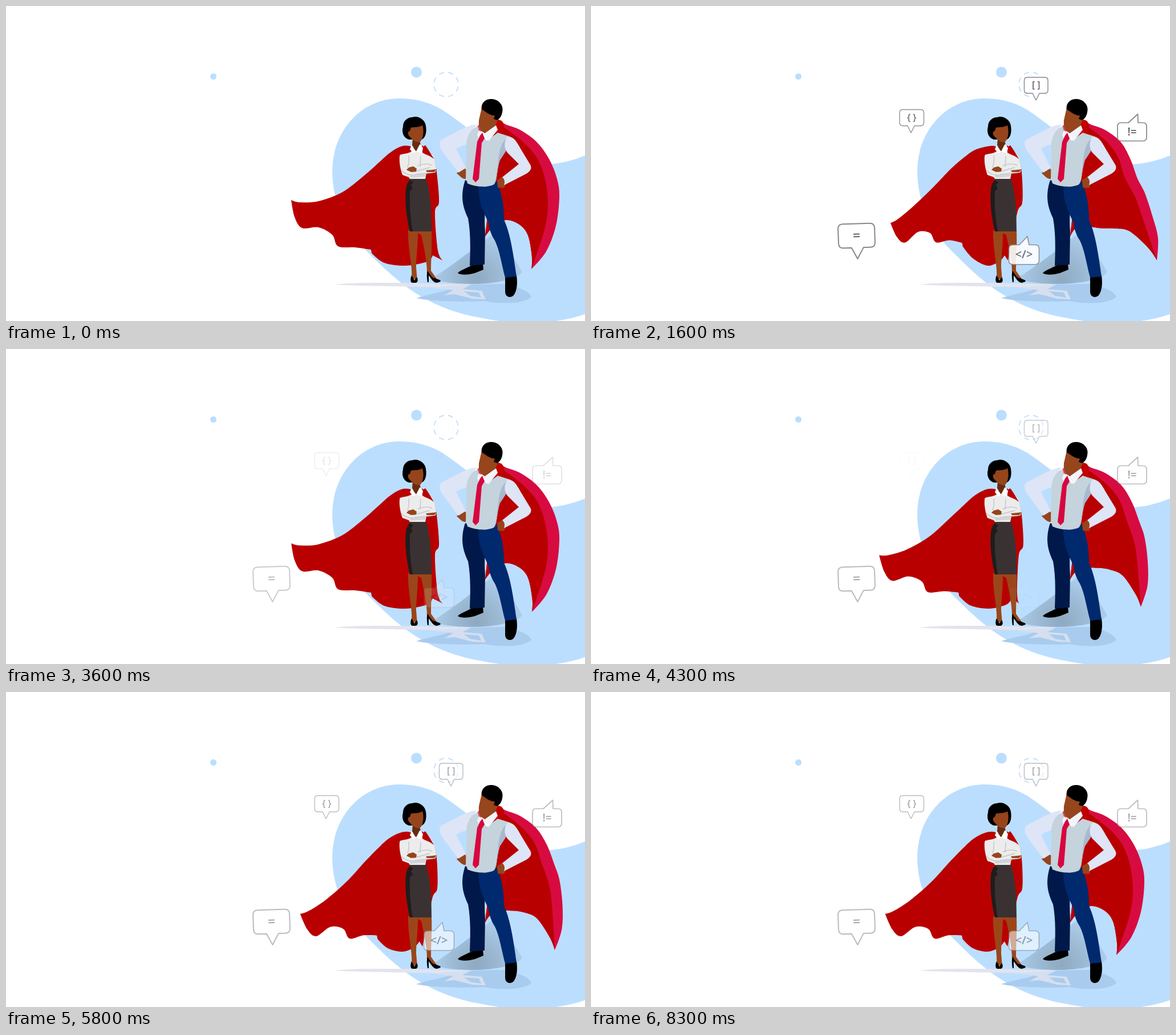
Animation, 1015 px wide and 552 px high, one loop 9100 ms. Source, as an HTML page:

```html
<!DOCTYPE html>
<html lang="en">
<head>
<meta charset="utf-8">
<title>Caped colleagues</title>
<style>
  html, body { margin: 0; width: 100%; height: 100%; overflow: hidden; background: #fff; }
  svg { display: block; width: 100vw; height: 100vh; }
  .bubble path { fill: #fff; stroke: #83858c; stroke-linejoin: round; }
  .bubble text { fill: #606065; font-family: "Open Sans", "Noto Sans", sans-serif; font-weight: 600; text-anchor: middle; }
</style>
</head>
<body>
<svg viewBox="0 0 1015 552" preserveAspectRatio="none">
  <defs>
    <radialGradient id="shade" gradientUnits="userSpaceOnUse" cx="825" cy="478" r="95">
      <stop offset="0" stop-color="#8ea9c1"/>
      <stop offset=".5" stop-color="#9fbdd8"/>
      <stop offset="1" stop-color="#b4d5f3"/>
    </radialGradient>
  </defs>

  <g fill="#bbdeff">
    <path d="M1015 262C985 274 955 281 925 275C860 262 815 215 765 182C740 167 715 162 690 162C622 162 572 220 572 290C572 345 598 394 630 427C680 477 730 528 830 546C890 559 960 559 1015 540Z"/>
    <circle cx="363.5" cy="123.5" r="5.5"/>
    <circle cx="719.5" cy="116" r="9.5"/>
    <circle cx="771.5" cy="137.5" r="21.5" fill="none" stroke="#bbdeff" stroke-width="1.7" pathLength="144" stroke-dasharray="10 8" stroke-dashoffset="-4"/>
  </g>

  <g id="ground">
    <path fill="url(#shade)" d="M852 400C870 405 890 440 905 466C898 480 850 488 812 487C785 487 760 483 745 478C772 462 805 437 852 400Z"/>
    <path fill="#e3e3ee" d="M574 488C620 484 680 485 735 486L815 488L790 494C730 491 640 492 574 488Z"/>
    <path fill="#a9cbee" d="M719 512C740 505 760 503 775 497L815 488L875 487C905 494 919 502 921 510C908 522 870 523 838 517C800 519 750 518 719 512Z"/>
    <path fill="#d5dfef" d="M746 493L816 488L800 496L834 499L841 514L818 513L786 505L768 507L784 498Z"/>
    <path fill="#a9cbee" d="M803 500L829 502L833 511L814 508Z"/>
  </g>

  <path id="band" fill="#d70b40"/>
  <path id="lining" fill="#b90000"/>
  <path id="cape" fill="#b90000"/>

  <g id="woman">
    <path fill="#9b461a" d="M705 393H746C747 422 745 443 745 464L757 481H750L738 468C738 446 732 420 728 401L722 398C722 422 719 440 719 458L721 481L711 477C713 455 704 425 705 393Z"/>
    <path d="M711 472C708 479 709 485 713 485H719C723 483 722 478 720 475L716 481Z"/>
    <path d="M739 464C737 470 738 477 739 484H741V472C746 478 748 484 755 485C761 484 764 482 760 480L752 477C748 478 743 470 739 464Z"/>
    <path fill="#3a3232" d="M709 303L736 302C743 322 746 350 746 395H708C702 370 699 340 701 322C702 312 705 308 709 303Z"/>
    <path fill="#201c1c" d="M708 305L714 309L710 314L713 320L708 324C707 350 709 372 713 395H708C702 370 699 340 701 322C702 313 704 309 708 305Z"/>
    <path d="M712 195C722 191 735 199 736 210C738 222 735 231 729 234H706C697 231 693 222 696 211C696 202 703 195 712 195Z"/>
    <path fill="#652c10" d="M713 231L712 244L719 255L727 243L725 236Z"/>
    <path fill="#96441b" d="M710 213C716 212 724 213 730 209C733 218 732 232 726 238C720 240 713 236 709 230C704 227 703 219 708 219Z"/>
    <path fill="#ececec" d="M711 246L708 255L691 259C688 269 691 285 695 296L706 300L708 303H735L737 293L752 292C757 287 752 275 749 264C747 259 740 257 734 256L730 246L725 243L719 255Z"/>
    <path fill="#b90000" d="M690 247L711 246L712 254C706 259 700 258 690 261ZM729 244C738 250 745 258 750 268C742 261 736 261 730 257Z"/>
    <path fill="#fff" d="M711 244L708 251L714 258L719 255ZM726 242L731 249L729 258L719 255Z"/>
    <path fill="none" stroke="#c3c5ca" stroke-width="1.4" d="M706 262C707 270 706 277 704 283M727 263L726 281M693 288C700 295 708 297 717 296M714 291L743 283M722 280C732 276 740 276 747 279M717 295L748 292"/>
    <path fill="#d3d4d7" d="M709 297L736 293L735 299L708 301Z"/>
    <path fill="#96441b" d="M702 287L706 283L714 281L720 285L719 290L710 291ZM736 288L747 287L755 286L751 291L738 291Z"/>
  </g>

  <g id="man">
    <path d="M818 453C810 459 795 463 792 468C797 472 812 471 822 468L837 462L836 452Z"/>
    <path d="M875 475L895 472C897 486 896 500 889 508C883 512 875 510 875 500Z"/>
    <path fill="#00194a" d="M805 305L830 315L845 318C840 350 838 370 840 395L839 453L813 455C814 430 815 400 810 372C802 355 795 335 805 305Z"/>
    <path fill="#00296e" d="M828 316C840 318 850 316 860 307C870 330 873 350 873 375C885 400 890 440 895 474L875 476C868 450 866 430 857 411C850 400 847 390 846 380C838 362 828 346 828 316Z"/>
    <path fill="#c00000" d="M857 203C864 195 874 202 873 212C872 221 866 226 859 228L860 214Z"/>
    <path fill="#d74763" d="M826 211L831 206L834 219L828 222Z"/>
    <path fill="#96441b" d="M793 290L801 282L807 287L806 303C800 304 795 297 790 293ZM861 305L871 299L877 310L873 319L862 318Z"/>
    <path fill="#dee5f6" d="M825 208C812 207 795 218 765 233C757 237 760 248 766 256L793 292L806 284L789 250C798 245 803 243 807 243L815 222Z"/>
    <path fill="#c5d3dc" d="M827 211C815 214 807 230 807 245C809 270 803 295 809 311C825 318 845 318 855 313C862 305 859 287 866 268C874 255 882 240 884 229L862 222L843 236L830 223Z"/>
    <path fill="#a8b9d0" d="M884 229C873 232 868 243 865 256C860 277 864 296 855 313C862 307 860 288 866 270L876 255Z"/>
    <path fill="#dee5f6" d="M878 230C889 226 896 239 902 250L919 278C923 285 918 290 912 294L873 314C875 308 874 303 870 300L899 277L879 257C873 250 873 239 878 230Z"/>
    <path fill="#7b3513" d="M833 216L858 206L860 217L844 229Z"/>
    <path fill="#96451c" d="M834 178L829 200C828 212 831 219 838 222C848 222 855 215 859 207L864 196L858 180Z"/>
    <path d="M834 181C832 171 840 162 852 163C864 164 873 174 870 186C869 193 865 198 861 200L855 198L857 192C848 192 842 186 834 181Z"/>
    <path fill="#f2f4fc" d="M829 218L837 223L831 238L826 226ZM838 224L859 209L862 217L846 237Z"/>
    <path fill="#d8063f" d="M831 227L835 222L839 232L834 240L829 303L823 309L818 303L826 238Z"/>
  </g>
  <g id="bubbles"></g>
</svg>
<script>
const LOOP = 9100, LAST = 8300, STEP = 100, SWING = 3500;
const { PI, sin, cos, min, max, exp } = Math;
const $ = id => document.getElementById(id);
const clamp = (v, lo, hi) => max(lo, min(hi, v));
const points = s => s.split(/\s+/).map(p => p.split(",").map(Number));

// Capes at rest; everything else follows from the wind rules below
const herCape = points(`735,244 722,250 705,245 690,247 672,258 655,273 628,297 590,326 548,342 515,344
  500,340 506,370 519,389 548,388 572,401 582,421 612,423 640,427 641,433 663,450 700,455 738,448
  748,437 766,446 757,428 752,362 759,344 756,300 752,275 743,256`);
const hisEdge = points("862,198 875,207 901,217 930,238 952,268 966,303 970,335 964,385 947,430");
const hisHem = points("921,461 922,440 915,402 900,383 877,375");
const hisBack = points("855,386 840,404 845,360 850,215");
const hisSeam = points("872,212 905,237 930,265 944,300 950,345 944,392");

// 0 at rest, 1 fully blown; skew makes the rise quicker than the return
function sway(t, end, skew) {
  const p = min(t, end) % SWING / SWING;
  return (1 - cos(2 * PI * p + skew * sin(PI * p))) / 2;
}

// The train turns about her shoulder and billows; the right edge is drawn in
function blowHers(s, stretch, lift) {
  const px = 690, py = 250;
  return ([x, y]) => {
    if (x >= px) return [x - 35 * s * (x - px) / 70 * (max(0, y - 260) / 190) ** 3, y];
    const w = min(1, (px - x) / 190), a = 0.23 * s * w, k = 1 + stretch * s * w;
    const dx = (x - px) * k, dy = (y - py) * k;
    return [px + dx * cos(a) + dy * sin(a), py - dx * sin(a) + dy * cos(a) - lift * s * sin(PI * w)];
  };
}

// The lower part flares out and up while the upper edge is drawn in
function blowHis(s) {
  return ([x, y]) => {
    const k = clamp((y - 300) / 160, 0, 1);
    const dx = 72 * k * k - 9 * exp(-(((y - 290) / 40) ** 2));
    const dy = clamp(1.2 * (908 - x), -24, 22) * min(1, 1.4 * k);
    return [x + dx * s, y + dy * s];
  };
}

// box: x, y, width, height; tail: left, tip x, tip y, right; beat: length of one pulse
const bubbles = [
  { text: "{ }", box: [541, 181.5, 42.5, 28.5], tail: [555, 561, 222, 567], size: 16, line: 1.4, beat: 4100 },
  { text: "[ ]", box: [759.5, 125, 41.5, 28], tail: [774, 780, 165, 786], size: 16, line: 1.4, beat: 3500 },
  { text: "!=", box: [923, 204.5, 51, 32], tail: [942, 958.5, 189.5, 959], size: 19, line: 1.7, beat: 3100 },
  { text: "=", box: [433.5, 381.5, 64, 42], tail: [456, 466, 443, 477], size: 23, line: 2, beat: 2950, turn: -2 },
  { text: "</>", box: [732.5, 418.5, 53, 34.5], tail: [751, 765, 403.5, 768], size: 20, line: 1.6, beat: 4100 }
];

function bubblePath([x, y, w, h], [a, tx, ty, b]) {
  const r = h / 5, up = ty < y;
  const top = up ? `H${a}L${tx} ${ty}L${b} ${y}` : "";
  const low = up ? "" : `H${b}L${tx} ${ty}L${a} ${y + h}`;
  return `M${x + r} ${y}${top}H${x + w - r}q${r} 0 ${r} ${r}v${h - 2 * r}q0 ${r} ${-r} ${r}` +
    `${low}H${x + r}q${-r} 0 ${-r} ${-r}v${2 * r - h}q0 ${-r} ${r} ${-r}Z`;
}

function make(tag, attrs, parent) {
  const el = document.createElementNS("http://www.w3.org/2000/svg", tag);
  for (const k in attrs) el.setAttribute(k, attrs[k]);
  return parent.appendChild(el);
}

for (const b of bubbles) {
  const [x, y, w, h] = b.box, cx = x + w / 2, cy = y + h / 2;
  b.el = make("g", { class: "bubble", transform: `rotate(${b.turn || 0} ${cx} ${cy})` }, $("bubbles"));
  make("path", { d: bubblePath(b.box, b.tail), "stroke-width": b.line }, b.el);
  make("text", { x: cx, y: cy + b.size * 0.33, "font-size": b.size }, b.el).textContent = b.text;
}

// One full pulse, then a second that stops part way
function fade(t, beat) {
  const level = sin(PI * t / beat) ** 2, hold = 0.55;
  if (t < beat) return level;
  return t > beat * 1.5 ? hold : min(hold, level);
}

// Closed smooth curve, sharp at the listed corners
function curve(pts, corners) {
  const n = pts.length, at = i => pts[(i + n) % n];
  const handle = (i, sign) => corners.includes(i % n) ? at(i)
    : at(i).map((v, c) => v + sign * (at(i + 1)[c] - at(i - 1)[c]) / 6);
  const fmt = p => p.map(v => v.toFixed(1)).join(" ");
  let d = "M" + fmt(pts[0]);
  for (let i = 0; i < n; i++) d += `C${fmt(handle(i, 1))} ${fmt(handle(i + 1, -1))} ${fmt(at(i + 1))}`;
  return d + "Z";
}

function draw(t) {
  const pull = sway(t, SWING * 1.5, 0);
  const hers = t < SWING ? blowHers(pull, 0, 20) : blowHers(pull, 0.06, 8);
  const his = blowHis(sway(t, SWING * 2, 0.5));
  const hem = [...hisHem.map(his), ...hisBack];
  $("cape").setAttribute("d", curve(herCape.map(hers), [0, 10, 17, 18, 22, 23]));
  $("band").setAttribute("d", curve([...hisEdge.map(his), ...hem], [0, 9, 15, 16, 17]));
  $("lining").setAttribute("d", curve([...hem, ...hisSeam.map(his)], [0, 6, 7, 8, 9]));
  for (const b of bubbles) b.el.setAttribute("opacity", fade(t, b.beat).toFixed(3));
}

const start = performance.now();
let shown = -1;
function tick() {
  const now = (performance.now() - start) % LOOP;
  const t = min(LAST, Math.floor(now / STEP) * STEP);
  if (t !== shown) draw(shown = t);
  requestAnimationFrame(tick);
}
tick();
</script>
</body>
</html>
```
